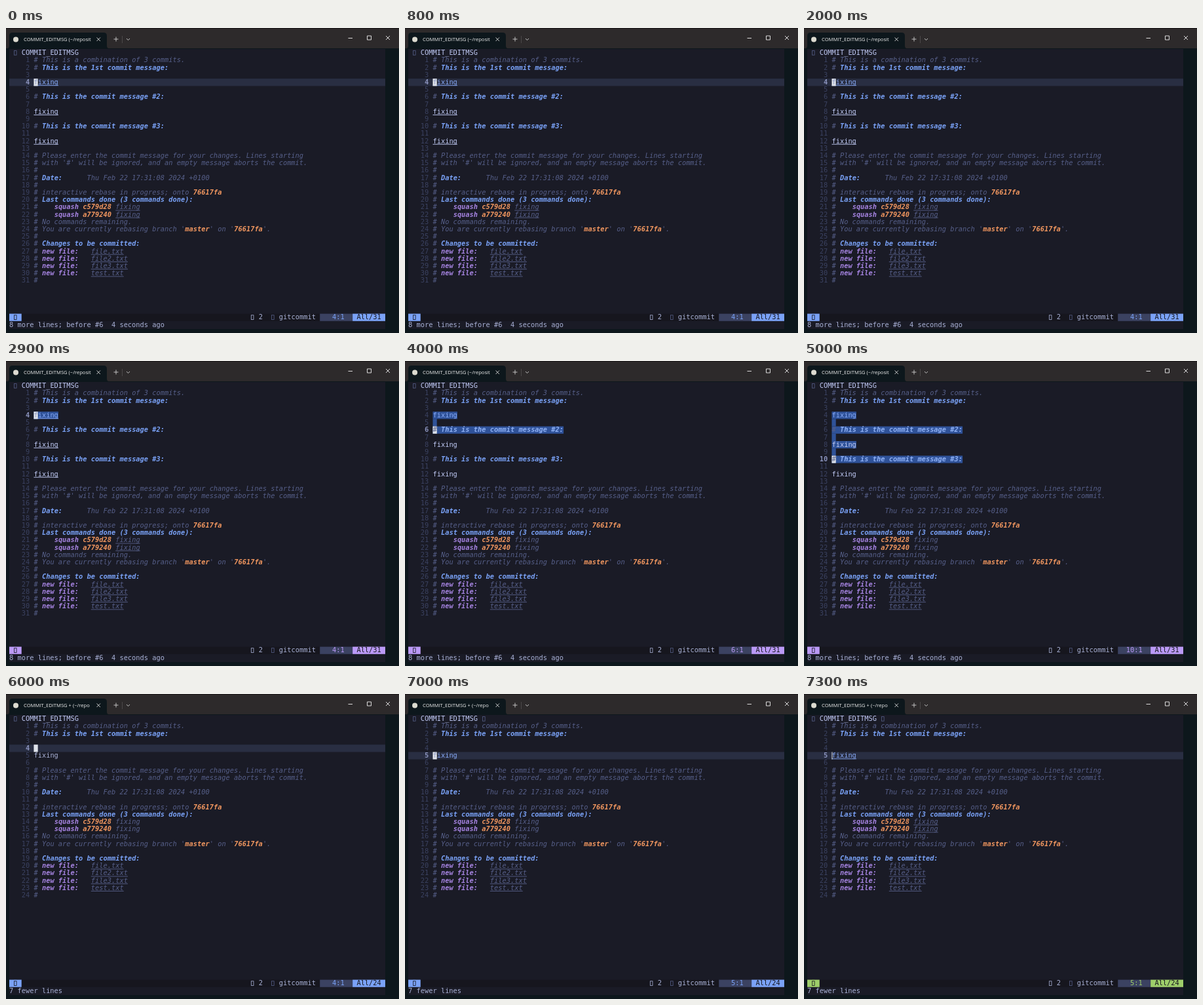
These frames come from a looping animation (600x465 px, 8 s). An HTML page with a canvas:

```html
<!DOCTYPE html>
<html lang="en">
<head>
<meta charset="utf-8">
<title>Squashing commits</title>
<style>
  html, body { margin: 0; width: 100%; height: 100%; overflow: hidden; background: #0d171c; }
  canvas { display: block; }
</style>
</head>
<body>
<canvas id="stage" width="600" height="465"></canvas>
<script>
const ctx = document.getElementById('stage').getContext('2d');
const LOOP = 8000, CELL = 6.24, ROW = 11.2, SIZE = 10.365;
const colX = n => 5 + n * CELL;
const rowY = n => 32.4 + n * ROW;
const MONO = '"DejaVu Sans Mono", monospace';

const C = {
  bg: '#1a1b26', dark: '#16161e', frame: '#0d171c', bar: '#2d2a2b',
  text: '#c0caf5', soft: '#a9b1d6', comment: '#565f89', blue: '#7aa2f7',
  purple: '#bb9af7', orange: '#ff9e64', green: '#9ece6a',
  gutter: '#3b4261', number: '#8b93bd', lineBg: '#292e42',
  selection: '#2f5299', cursor: '#dfe3ea'
};
const MODE_COLOR = { normal: C.blue, visual: C.purple, insert: C.green };

// First letter of each span selects its style.
const STYLES = {
  c: [C.comment, 'italic'],
  b: [C.blue, 'italic bold'],
  p: ['#a583e0', 'italic bold'],
  o: ['#f0965f', 'italic bold'],
  u: [C.comment, 'italic'],   // always underlined
  f: [C.comment, 'italic'],   // underlined while the word is matched
  w: [C.text, '']             // message word
};
const LINES = `c# This is a combination of 3 commits.
c# |bThis is the 1st commit message:

wfixing

c# |bThis is the commit message #2:

wfixing

c# |bThis is the commit message #3:

wfixing

c# Please enter the commit message for your changes. Lines starting
c# with '#' will be ignored, and an empty message aborts the commit.
c#
c# |bDate:|c      Thu Feb 22 17:31:08 2024 +0100
c#
c# interactive rebase in progress; onto |o76617fa
c# |bLast commands done (3 commands done):
c#    |psquash |oc579d28 |ffixing
c#    |psquash |oa779240 |ffixing
c# No commands remaining.
c# You are currently rebasing branch '|omaster|c' on '|o76617fa|c'.
c#
c# |bChanges to be committed:
c# |pnew file:   |ufile.txt
c# |pnew file:   |ufile2.txt
c# |pnew file:   |ufile3.txt
c# |pnew file:   |utest.txt
c#`.split('\n').map(l => l ? l.split('|').map(s => [s[0], s.slice(1)]) : []);
const SQUASHED = LINES.filter((_, i) => i < 3 || i > 9);

// [start ms, mode, cursor line, word matches underlined]
const STEPS = [
  [0, 'normal', 4, true],
  [2900, 'visual', 4, true],
  [3800, 'visual', 5, false],
  [4000, 'visual', 6, false],
  [4200, 'visual', 7, false],
  [4400, 'visual', 8, false],
  [4600, 'visual', 9, false],
  [4700, 'visual', 10, false],
  [6000, 'normal', 4, false],
  [7000, 'normal', 5, false],
  [7100, 'normal', 5, true],
  [7200, 'insert', 5, true]
];
const DELETED_AT = 6000, SETTLED_AT = 6100;

function rect(x, y, w, h, color) {
  ctx.fillStyle = color;
  ctx.fillRect(x, y, w, h);
}

function write(str, c, r, color, style = '') {
  ctx.font = `${style} ${SIZE}px ${MONO}`;
  ctx.fillStyle = color;
  ctx.fillText(str, colX(c), rowY(r) + 8.8);
}

// Placeholder box of a missing glyph
function tofu(c, r, color) {
  ctx.strokeStyle = color;
  ctx.lineWidth = 0.8;
  ctx.strokeRect(colX(c) + 1.2, rowY(r) + 2.2, 3.6, 6.6);
}

function stroke(path, color, width = 1) {
  ctx.strokeStyle = color;
  ctx.lineWidth = width;
  ctx.stroke(new Path2D(path));
}

function drawWindow(modified) {
  rect(0, 0, 600, 465, C.frame);
  rect(0, 0, 600, 31, C.bar);
  rect(0, 0, 600, 1, '#171516');
  ctx.fillStyle = C.frame;
  ctx.fill(new Path2D('M2 31Q5 31 5 27V12Q5 7 10 7H149Q154 7 154 12V27Q154 31 157 31Z'));
  ctx.fillStyle = '#dcdad0';
  ctx.beginPath();
  ctx.arc(15, 17.5, 4, 0, 7);
  ctx.fill();

  ctx.save();
  ctx.beginPath();
  ctx.rect(26, 8, 104, 20);
  ctx.clip();
  ctx.font = '7.6px "Open Sans", sans-serif';
  ctx.fillStyle = '#f0f0f0';
  ctx.fillText(modified ? 'COMMIT_EDITMSG + (~/repo' : 'COMMIT_EDITMSG (~/reposit', 27, 20.2);
  ctx.restore();

  stroke('M138.5 14.5l5.5 5.5m0 -5.5l-5.5 5.5', '#d8d8d8', 0.9);
  stroke('M164.5 17h7M168 13.5v7M184 16l2.5 2.5l2.5 -2.5', '#d0d0d0', 0.9);
  stroke('M177.5 12v11', '#4c494a');
  stroke('M522.5 15.5h6.5M551.5 12h6v6h-6zM580 12l6 6m0 -6l-6 6', '#f0f0f0', 0.9);
  rect(5, 32, 574, 427, C.bg);
}

function drawLine(spans, n, state, wordColor) {
  const { mode, line, matched } = state;
  const current = n === line;
  const selected = mode === 'visual' && n >= 4 && n <= line;
  const length = spans.reduce((sum, s) => sum + s[1].length, 0);

  if (selected) rect(colX(6), rowY(n), Math.max(1, length) * CELL, ROW, C.selection);
  else if (current) rect(5, rowY(n), 574, ROW, C.lineBg);
  write(String(n).padStart(2), 3, n, current ? C.number : C.gutter, current ? 'bold' : '');

  let c = 6;
  for (const [key, str] of spans) {
    const [base, style] = STYLES[key];
    const color = key === 'w' ? wordColor : selected && key === 'b' ? '#8eb0f5' : base;
    write(str, c, n, color, style);
    if (key === 'u' || matched && 'fw'.includes(key))
      rect(colX(c), rowY(n) + 10, str.length * CELL, 0.9, color);
    c += str.length;
  }

  if (!current) return;
  rect(colX(6), rowY(n), mode === 'insert' ? 1 : CELL, ROW, C.cursor);
  if (mode !== 'insert' && length)
    write(spans[0][1][0], 6, n, spans[0][0] === 'c' ? C.comment : '#8f9bc4', STYLES[spans[0][0]][1]);
}

function drawStatus({ mode, line }, count, deleted) {
  const accent = MODE_COLOR[mode], y = rowY(36);
  rect(5, y, 574, ROW, C.dark);
  rect(5, y, 3 * CELL, ROW, accent);
  rect(colX(76), y, 8 * CELL, ROW, C.gutter);
  rect(colX(84), y, 579 - colX(84), ROW, accent);
  tofu(1, 36, C.dark);
  tofu(59, 36, C.soft);
  write('2', 61, 36, C.soft);
  tofu(64, 36, C.comment);
  write('gitcommit', 66, 36, C.soft);
  write(`${line}:1`.padStart(4), 78, 36, accent);
  write(`All/${count}`, 85, 36, C.dark);
  write(deleted ? '7 fewer lines' : '8 more lines; before #6  4 seconds ago', 0, 37, C.soft);
}

function draw(t) {
  const [, mode, line, matched] = STEPS.filter(s => s[0] <= t).pop();
  const state = { mode, line, matched };
  const deleted = t >= DELETED_AT, settled = t >= SETTLED_AT;
  const lines = deleted ? SQUASHED : LINES;
  const summary = deleted ? 5 : 4;

  drawWindow(deleted);
  tofu(1, 0, C.comment);
  write('COMMIT_EDITMSG', 3, 0, C.text);
  if (settled) tofu(18, 0, C.comment);
  lines.forEach((spans, i) => {
    const n = i + 1;
    const wordColor = n !== summary ? C.text : deleted && !settled ? C.soft : '#86a8f5';
    drawLine(spans, n, state, wordColor);
  });
  drawStatus(state, lines.length, deleted);
}

function tick() {
  draw(performance.now() % LOOP);
  requestAnimationFrame(tick);
}
tick();
</script>
</body>
</html>
```
